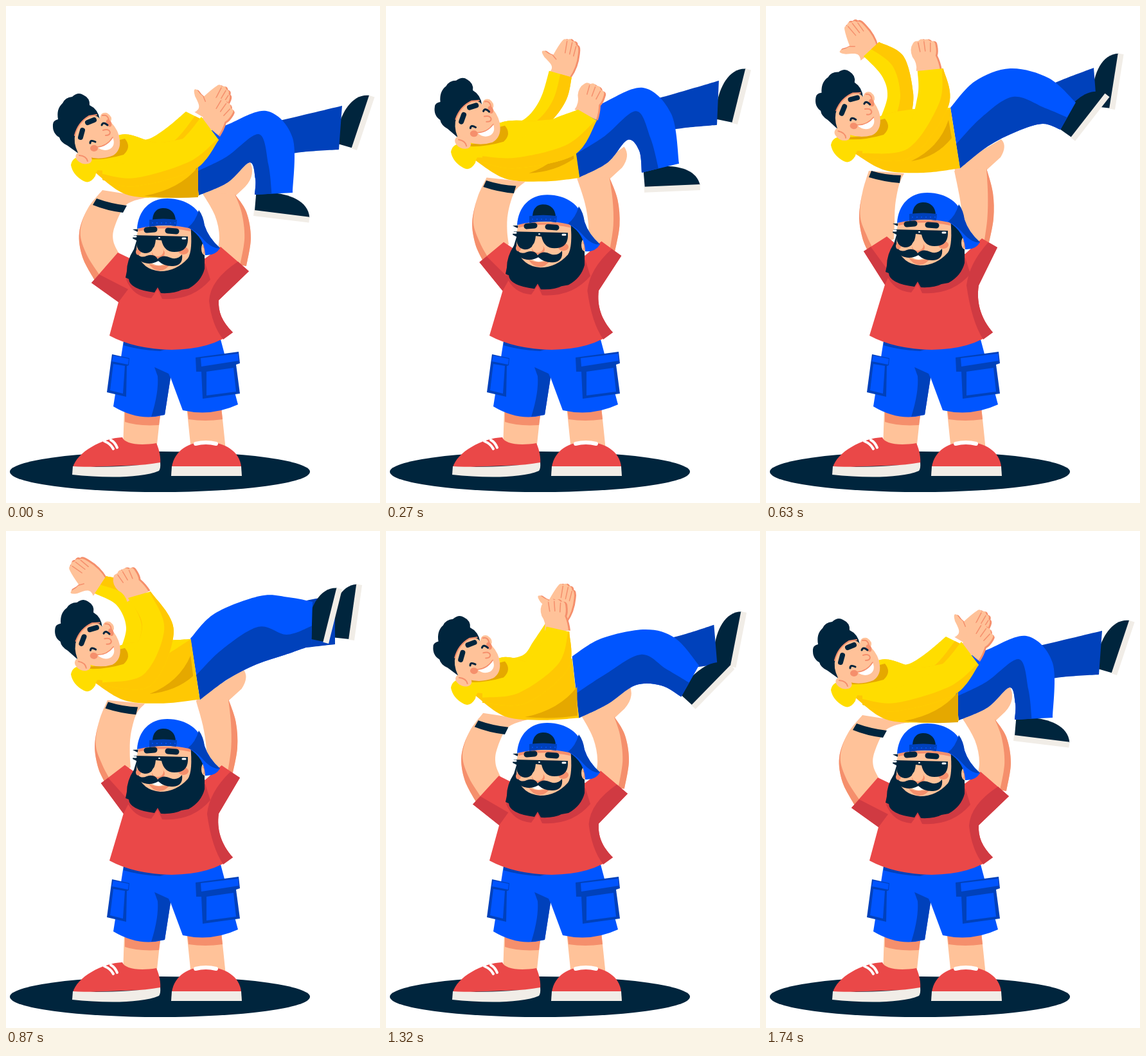
An HTML page with a canvas that plays this animation: 582x772 px, repeating every 1770 ms.

```html
<!DOCTYPE html>
<html lang="en">
<head>
<meta charset="utf-8">
<title>Lift</title>
<style>
html, body { margin: 0; width: 100%; height: 100%; overflow: hidden; background: #fff; }
canvas { display: block; }
</style>
</head>
<body>
<canvas id="stage" width="582" height="772"></canvas>
<script>
const ctx = document.getElementById('stage').getContext('2d');
const NAVY = '#00253d', BLUE = '#0055ff', DEEP = '#0041bb', RED = '#ea4848', WINE = '#d03a42',
  SKIN = '#ffc299', BLUSH = '#f58f6c', YELLOW = '#ffdd00', AMBER = '#ffc803', OCHRE = '#e5a800', SOLE = '#f1ede7';
const LOOP = 1770, KEYS = [0, 270, 630, 870, 1140, 1500, 1740];
const ARM_KEYS = [0, 270, 450, 630, 870, 1140, 1500, 1740];
const NUM = /-?[\d.]+/g;
const nums = s => s.match(NUM).map(Number);
const poses = (...list) => [...list, list[0]].map(nums);

let time = 0, lift = 0;

// Monotone cubic through one value per key
function track(values, keys) {
  const last = keys.length - 1;
  const slope = i => (values[i + 1] - values[i]) / (keys[i + 1] - keys[i]);
  const tangent = i => {
    if (i === 0 || i === last) return 0;
    const a = slope(i - 1), b = slope(i);
    return a * b > 0 ? 2 * a * b / (a + b) : 0;
  };
  if (time >= keys[last]) return values[last];
  let i = 0;
  while (time >= keys[i + 1]) i++;
  const d = keys[i + 1] - keys[i], u = (time - keys[i]) / d, v = 1 - u;
  return values[i] * (1 + 2 * u) * v * v + values[i + 1] * u * u * (3 - 2 * u)
    + d * u * v * (tangent(i) * v - tangent(i + 1) * u);
}
const blend = (list, keys = KEYS) => list[0].map((_, c) => track(list.map(p => p[c]), keys));

// Path between the lowest and the highest pose
function mix(low, high) {
  const h = nums(high);
  let i = 0;
  return low.replace(NUM, n => +n + (h[i++] - n) * lift);
}

function fill(color, d) {
  ctx.fillStyle = color;
  ctx.fill(new Path2D(d));
}
function line(color, width, d) {
  ctx.strokeStyle = color;
  ctx.lineWidth = width;
  ctx.lineCap = 'round';
  ctx.stroke(new Path2D(d));
}
function oval(color, x, y, rx, ry, deg = 0) {
  ctx.fillStyle = color;
  ctx.beginPath();
  ctx.ellipse(x, y, rx, ry, deg * Math.PI / 180, 0, 7);
  ctx.fill();
}
function place(x, y, deg, draw) {
  ctx.save();
  ctx.translate(x, y);
  ctx.rotate(deg * Math.PI / 180);
  draw();
  ctx.restore();
}

function spline(path, pts) {
  for (let i = 0; i < pts.length - 1; i++) {
    const p = pts[i], q = pts[i + 1], o = pts[i - 1] || p, r = pts[i + 2] || q;
    path.bezierCurveTo(p[0] + (q[0] - o[0]) / 6, p[1] + (q[1] - o[1]) / 6,
      q[0] - (r[0] - p[0]) / 6, q[1] - (r[1] - p[1]) / 6, ...q);
  }
}
// Limb between two edges; from and to pick a strip across it
function ribbon(color, n, from = 0, to = 1) {
  const half = n.length / 2, path = new Path2D();
  const edge = k => Array.from({ length: half / 2 }, (_, i) => {
    const s = Array.isArray(k) ? k[i] : k;
    return [0, 1].map(c => n[2 * i + c] * (1 - s) + n[half + 2 * i + c] * s);
  });
  const a = edge(from), b = edge(to).reverse();
  path.moveTo(...a[0]);
  spline(path, a);
  path.lineTo(...b[0]);
  spline(path, b);
  path.closePath();
  ctx.fillStyle = color;
  ctx.fill(path);
}

const nearLeg = poses(
  '289,203 340,186 405,163 446,205 446,290  300,294 345,274 379,243 388,268 387,293',
  '287,176 335,152 400,127 444,168 456,245  301,266 345,243 376,208 394,225 398,259',
  '287,158 325,117 380,97 440,112 482,150  302,252 345,218 390,195 430,183 458,192',
  '287,167 325,128 395,101 440,103 477,110  302,262 345,230 390,207 435,192 475,178',
  '289,187 335,150 400,134 450,138 490,148  301,283 345,255 390,232 435,218 481,208',
  '290,200 335,180 405,163 450,190 480,265  300,294 345,276 385,243 415,258 424,293');
const farLeg = poses(
  '400,184 460,170 523,155  420,234 460,227 518,223',
  '400,150 460,133 518,116  420,196 460,190 515,185',
  '400,140 460,115 510,96  400,190 460,170 513,135',
  '400,130 460,110 512,100  400,190 460,182 512,176',
  '400,160 460,150 505,133  400,200 460,195 515,190',
  '400,184 460,168 518,153  420,234 460,227 516,221');
const farShoe = poses('546,224,-71.5', '547,184,-76', '543,161,-81', '542,170,-82', '542,198,-81', '547,221,-76');
const nearShoe = poses('385,326,7', '402,290,-2.5', '481,210,-52', '502,175,-76', '508,217,-69', '437,321,-16');
const nearSleeve = poses(
  '150,240 205,243 268,212 304,172  150,270 200,280 292,255 331,208',
  '150,213 210,205 255,178 299,161  150,242 200,252 292,232 328,178',
  '150,215 215,195 236,140 236,101  150,235 225,235 284,155 276,97',
  '150,225 195,190 212,145 190,104  150,240 225,240 261,155 225,94',
  '150,240 180,198 209,165 209,130  150,260 235,250 273,170 243,115',
  '150,240 200,241 262,206 289,163  150,270 200,280 290,252 323,195');
const farSleeve = poses(
  '178,200 215,208 245,193 280,164  210,235 250,240 285,220 308,178',
  '175,187 215,176 240,145 254,101  215,215 258,178 281,145 289,111',
  '176,178 205,155 203,118 190,75  225,190 245,150 245,110 225,68',
  '176,180 189,140 180,108 152,78  225,175 229,135 214,78 176,56',
  '176,190 187,150 172,115 138,97  225,185 235,140 200,85 156,70',
  '178,200 208,170 212,140 210,110  220,215 262,170 262,130 232,91',
  '178,200 215,208 240,193 275,163  210,235 250,240 280,220 303,178');
const farHand = poses('312,172,18', '274,105,0', '206,70,-26', '161,70,-50', '145,83,-65', '213,100,-25', '304,166,15');
const nearHand = poses('319,190,43', '313,169,28', '255,99,0', '207,100,-23', '225,123,-25', '308,180,36');

function shoe([x, y, deg]) {
  place(x, y, deg, () => {
    fill(NAVY, 'M1,-8 L0,-34 L22,-39 C50,-41 82,-34 87,-8Z');
    fill(SOLE, 'M0,-9 H87 V0 H0Z');
  });
}
function hand([x, y, deg], shape, fingers) {
  place(x, y, deg, () => {
    fill(BLUSH, shape);
    ctx.translate(-3, 0);
    fill(SKIN, shape);
    line(BLUSH, 1.5, fingers);
  });
}

function carrierLegs() {
  oval(NAVY, 239.5, 723.5, 233.5, 31.5);
  fill(SKIN, 'M184,625 H241 L234,690 H182Z M281,622 H335 L342,690 H288Z');
  fill(BLUSH, 'M185,630 L241,630 L238,651 Q205,653 185,646Z M282,625 H335 L337,642 Q310,646 284,642Z');
  fill(RED, 'M104,717 C110,693 150,671 181,670 C184,679 205,684 234,679 C239,690 241,702 240,712Z');
  fill(SOLE, 'M104,715 C140,717 200,716 240,709 Q241,718 238,722 C210,734 150,733 103,728Z');
  line('#fff', 4, 'M163,674 Q170,678 173,686 M153,676 Q163,680 167,688');
  fill(RED, 'M258,716 C262,690 285,677 311,677 C340,677 364,692 366,716Z');
  fill(SOLE, 'M258,715 H366 L367,730 H257Z');
  line('#fff', 6, 'M295,680 Q311,676 327,680');

  fill(BLUE, 'M183,520 L334,518 L361,619 Q320,638 275,628 L256,577 L247,635 Q207,646 167,622Z');
  fill(DEEP, 'M183,521 L260,530 L240,536 Q205,534 183,527Z M231,561 L253,571 L256,578 L247,635 L226,638 Q238,600 236,575Z');
  fill(DEEP, 'M165,541 L192,547 L191,558 L188,559 L187,607 L157,600 L163,555Z M295,546 L362,537 L364,555 L358,557 L364,602 L306,610 L304,568 L296,568Z');
  fill(BLUE, 'M167,543 L191,548 L190,557 L165,552Z M167,556 L185,559 L182,602 L162,597Z M303,547 L361,540 L362,551 L304,560Z M312,568 L354,562 L358,599 L312,605Z');
}

function carrierArms() {
  const left = nums(mix(
    '150,286 127,315 114,352 119,390 138,426  220,297 187,309 169,343 167,365 176,385',
    '160,256 150,290 145,328 150,360 158,380  215,260 207,278 201,310 200,340 199,362'));
  ribbon(SKIN, left);
  ribbon(BLUSH, left, 0, [0, 0, .03, .14, .2]);
  fill(NAVY, mix('M141,299 Q163,307 188,310 L182,321 Q157,318 135,309Z', 'M164,256 Q187,263 210,263 L208,275 Q183,273 160,266Z'));

  fill(SKIN, mix('M304,285 L345,272 L379,240 Q390,262 372,281 L356,296 L310,297Z', 'M293,250 L340,222 L366,207 Q376,217 365,235 L343,255 L295,262Z'));
  const right = nums(mix(
    '305,290 325,325 332,360 325,395  356,292 374,320 381,360 374,404',
    '293,256 301,295 306,330 310,370  343,252 353,290 354,330 346,372'));
  ribbon(SKIN, right);
  ribbon(BLUSH, right, [1, .85, .8, .8], 1);
}

function shirt() {
  fill(RED, mix(
    'M174,383 L133,430 L175,460 L161,512 Q200,533 258,534 Q320,533 353,507 C336,490 330,475 331,457 L378,412 L334,374 L310,392 L195,393Z',
    'M188,358 L152,381 L185,433 L161,512 Q200,533 258,534 Q320,533 353,507 C334,485 327,460 331,434 L360,375 L336,361 L310,385 L200,368Z'));
  fill(WINE, mix(
    'M133,430 L145,417 L190,440 L175,460Z M378,412 L361,397 Q318,425 316,458 Q320,495 338,518 L353,507 C336,490 330,475 331,457Z',
    'M152,381 L163,374 L193,415 L185,433Z M360,375 L346,367 Q316,400 312,434 Q320,490 338,518 L353,507 C334,485 327,460 331,434Z'));
}

function carrierHead() {
  ctx.save();
  ctx.translate(0, -9 * lift);
  fill(WINE, 'M187,425 Q198,452 226,454 L236,440 L243,455 Q290,458 318,425 L310,400 L200,400Z');
  fill(NAVY, 'M197,347 L207,352 L199,378 Q188,395 188,412 L186,422 L191,424 Q192,440 231,445 L236,437 L241,446 Q262,447 273,441 L284,439 Q304,428 309,408 L309,380 L306,360 L286,342Z');
  oval(SKIN, 309, 377, 5, 10);
  line(BLUSH, 2, 'M307,374 Q311,376 308,384');
  fill(SKIN, 'M207,340 L287,340 Q291,380 283,392 Q265,412 240,412 Q212,410 203,382 L204,355Z');
  fill(BLUSH, 'M207,342 L286,342 L287,350 Q245,341 206,350Z');
  oval(BLUSH, 276, 380, 8, 6);
  oval(BLUSH, 206, 382, 4, 5);
  line(NAVY, 9, 'M219,348 L231,347 M252,349 L265,350');
  fill(NAVY, 'M199,356 L283,358 L283,364 Q282,382 262,382 Q246,382 242,364 L233,363 Q231,384 216,384 Q202,382 203,364 L197,361Z');
  line('#fff', 3, 'M199,358 L202,358 M275,361 L279,361');
  line('#fff', 2, 'M238,360 L239,360');
  oval(BLUSH, 237, 384, 10, 8);
  oval(SKIN, 236, 381, 9, 8);
  fill(BLUSH, 'M222,400 Q239,407 256,400 Q248,412 238,411 Q228,410 222,400Z');
  fill('#fff', 'M224,396 H250 Q246,403 237,403 Q229,402 224,396Z');
  fill(NAVY, 'M205,386 Q211,392 219,388 Q231,384 236,393 Q244,385 256,391 Q266,395 274,386 Q276,403 260,404 Q247,405 237,396 Q226,402 216,399 Q204,396 205,386Z');
  fill(BLUE, 'M204,346 C206,317 224,299 251,299 C281,299 303,315 309,341 Q315,360 333,376 Q326,388 310,387 Q309,360 285,345 Q245,336 204,346Z');
  fill(DEEP, 'M300,317 Q307,326 309,341 Q315,360 333,376 Q320,378 304,359 Q295,349 283,344 Q295,335 300,317Z');
  fill(NAVY, 'M228,334 C228,319 236,314 245,314 C256,314 264,321 264,334Z');
  fill(DEEP, 'M223,332 Q245,329 266,332 L265,342 Q245,339 223,343Z');
  for (let x = 228; x < 265; x += 7) oval(BLUE, x, 337, 1, 1);
  ctx.restore();
}

function riderHead() {
  place(120 - 2 * lift, 235 - 37 * lift, 7 * lift, () => {
    ctx.translate(-120, -235);
    fill(NAVY, 'M114,230 L96,217 Q85,212 83,204 Q72,198 73,184 Q73,178 81,176 Q78,160 88,151 Q92,142 103,141 Q112,133 120,138 Q131,143 130,154 Q143,160 146,176Z');
    fill(SKIN, 'M112,228 Q104,212 108,198 Q112,182 127,173 Q138,166 146,175 Q147,164 157,166 Q167,172 163,180 Q176,194 177,208 Q179,224 167,232 Q140,243 112,228Z');
    line(BLUSH, 2, 'M107,201 Q112,181 129,171 L141,169 M150,170 Q158,168 160,177');
    oval(SKIN, 121, 236, 13, 9, 20);
    line(BLUSH, 2, 'M114,232 Q125,233 127,241');
    oval(BLUSH, 137, 221, 6, 5);
    oval(BLUSH, 160, 182, 4, 6, -25);
    line(NAVY, 8, 'M116,204 L119,193 M127,181 L137,177');
    line(NAVY, 3, 'M131,213 Q131,207 139,211 M149,185 Q151,179 158,185');
    line(BLUSH, 2, 'M151,193 Q160,190 162,196 Q162,201 155,201');
    fill('#fff', 'M142,219 Q157,218 166,204 Q171,216 162,222 Q152,227 142,219Z');
    line(BLUSH, 1.5, 'M142,219 Q157,218 166,204');
  });
}

function rider() {
  const leg = blend(nearLeg), sleeve = blend(nearSleeve), back = blend(farSleeve, ARM_KEYS);
  shoe(blend(farShoe));
  ribbon(DEEP, blend(farLeg));
  shoe(blend(nearShoe));
  ribbon(BLUE, leg);
  ribbon(DEEP, leg, [.6, .55, .45, .65, .55], 1);

  hand(blend(farHand, ARM_KEYS),
    'M-17,-1 C-8,-10 -14,-15 -24,-25 Q-32,-37 -24,-35 Q-18,-30 -11,-28 Q-2,-44 3,-50 Q7,-56 11,-52 Q16,-56 19,-50 Q25,-50 25,-44 Q30,-43 28,-30 Q26,-10 15,6Z',
    'M11,-50 L8,-32 M19,-48 L15,-30 M25,-42 L21,-27 M-11,-28 L-6,-22');
  ribbon(YELLOW, back);
  ribbon(AMBER, back, .5, 1);

  const torso = nums(mix(
    '120,240 178,200 235,212 290,203  138,258 185,292 245,298 300,295',
    '120,208 176,172 232,160 287,158  138,229 185,255 245,259 302,252'));
  ribbon(AMBER, torso);
  ribbon(YELLOW, torso, 0, [.8, .6, .3, 0]);
  fill(OCHRE, mix('M299,250 Q270,285 215,295 Q260,300 299,297Z', 'M284,177 Q270,220 226,241 Q265,235 289,205Z'));

  hand(blend(nearHand),
    'M-18,2 Q-16,-10 -24,-20 Q-29,-32 -23,-41 Q-20,-46 -15,-44 Q-11,-50 -6,-46 Q-1,-50 4,-44 Q11,-46 12,-38 Q14,-28 12,-22 Q17,-12 19,0Z',
    'M-15,-42 L-12,-28 M-6,-44 L-4,-29 M4,-42 L4,-28');
  ribbon(YELLOW, sleeve);
  ribbon(AMBER, sleeve, [.7, .65, .7, .95], 1);

  ctx.save();
  ctx.translate(0, -31 * lift);
  fill(YELLOW, 'M101,247 Q103,235 116,234 L165,232 L184,206 Q196,218 187,230 Q178,244 150,249 Q140,254 139,264 Q131,277 121,272 Q104,263 101,247Z');
  fill(OCHRE, 'M126,234 Q160,238 177,208 L185,206 Q196,219 183,231 Q152,240 126,238Z');
  ctx.restore();
  riderHead();
}

function frame(now) {
  time = now % LOOP;
  lift = track([0, .65, 1, .78, .33, 0, 0], KEYS);
  ctx.clearRect(0, 0, 582, 772);
  carrierLegs();
  carrierArms();
  shirt();
  carrierHead();
  rider();
  requestAnimationFrame(frame);
}
requestAnimationFrame(frame);
</script>
</body>
</html>
```
